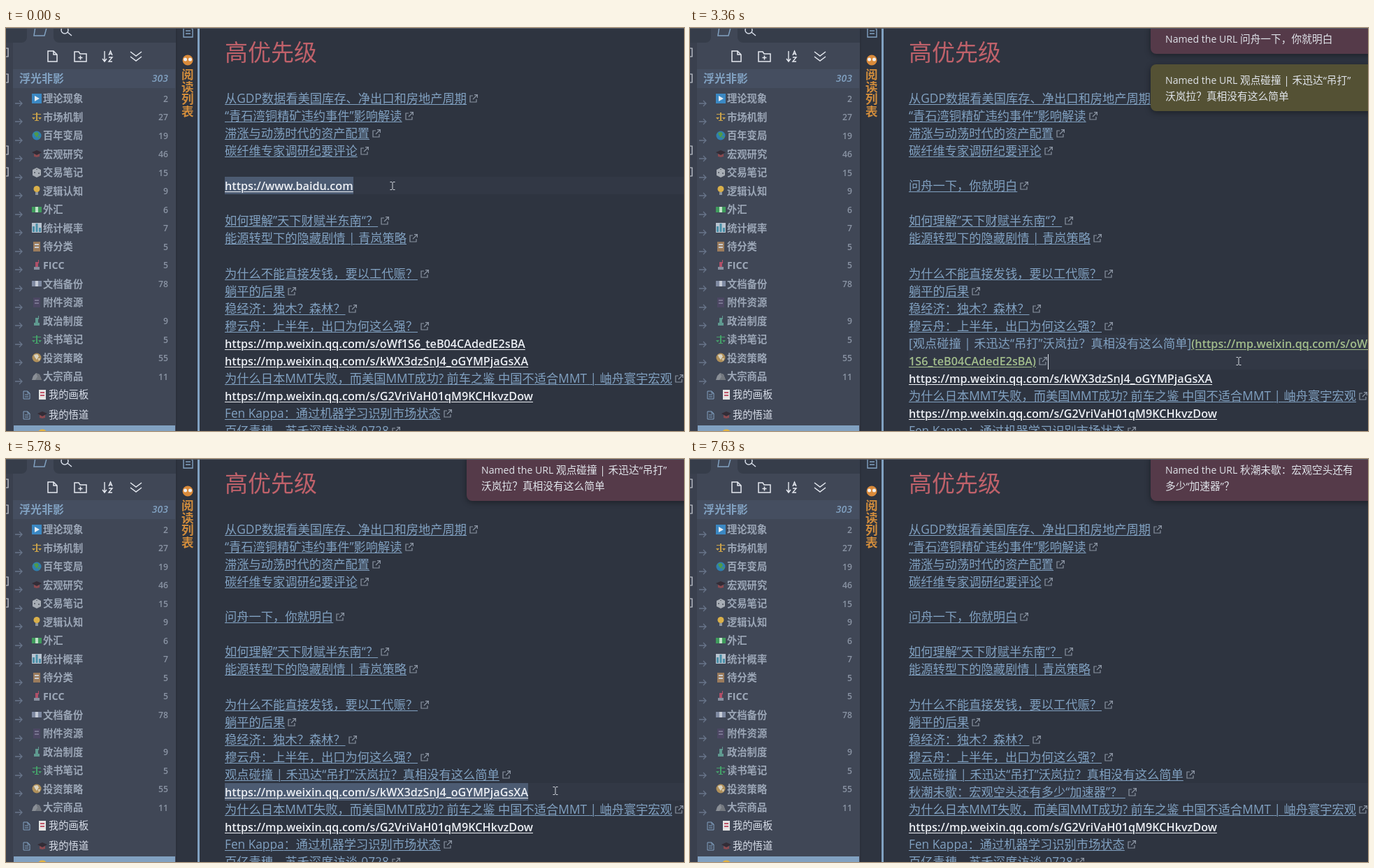
These frames come from a looping animation (970x577 px, 7650 ms). An HTML page:

```html
<!DOCTYPE html>
<html lang="zh">
<meta charset="utf-8">
<title>Link titles</title>
<style>
html,body{margin:0;width:100%;height:100%;overflow:hidden;background:#2e3440}
#stage{position:relative;width:970px;height:577px;overflow:hidden;font:17.25px/25.1px "Open Sans","Noto Sans CJK SC",sans-serif;color:#eceff4}
#stage div,#stage>svg{position:absolute;white-space:pre}
svg{overflow:visible}
.label{line-height:20px;font-size:14.3px;font-weight:700;color:#9ca7b7}
.count{width:100px;text-align:right;font-size:12.2px;font-weight:600;color:#8b95a5}
.row{left:313px;width:657px;height:25.1px}
.active{background:#323845}
.link,.url,.target{text-decoration:underline 1px;text-underline-offset:2px}
.link,.raw{color:#81a1c1;font-weight:300}
.link b,.raw b{font-weight:400}
.url,.target{font-size:16.2px;font-weight:600}
.target{color:#a3be8c}
.picked{display:inline-block;height:25.1px;background:#4c5b72}
.ext{width:12px;height:12px;margin:0 1px 0 4px;fill:none;stroke:#8a93a1;stroke-width:1.2}
.caret{display:inline-block;width:1px;height:22px;margin-right:-1px;background:#d8dee9;vertical-align:-6px}
#toasts{top:-7px;width:340px}
#toasts p{margin:0 0 15px;padding:10.5px 21px;border-radius:8px;font-size:14.72px;line-height:23px;background:#553a49;color:#e0e4ea;box-shadow:0 2px 8px #0006}
#toasts p+p{background:#545134}
#toasts small{font-size:14.1px}
</style>
<div id="stage"></div>
<script>
const stage = document.getElementById('stage');
const LOOP = 7650, FRAME = 135, BLINK = 500, PITCH = 25.1, FIRST_ROW = 87.5;

const add = html => stage.insertAdjacentHTML('beforeend', html);
const box = (x, y, w, h, color, extra = '') =>
  add(`<div style="left:${x}px;top:${y}px;width:${w}px;height:${h}px;background:${color};${extra}"></div>`);
const label = (x, y, text, css = '', type = '') =>
  add(`<div class="label ${type}" style="left:${x}px;top:${y - 10}px;${css}">${text}</div>`);
const count = (y, n, css) => label(132, y, n, css, 'count');
const line = (x, y, path, color = '#e5e9f0', width = 1.5) =>
  add(`<svg style="left:${x}px;top:${y}px" width="1" height="1"><path d="${path}" fill="none" stroke="${color}" stroke-width="${width}"/></svg>`);
const disc = (x, y, r) => `M${x - r} ${y}a${r} ${r} 0 1 0 ${2 * r} 0a${r} ${r} 0 1 0 ${-2 * r} 0z`;

// Small two-colour pictures: base shape, then accent
const shapes = {
  play: ['M0 0h14v14H0z', 'M4 3l7 4-7 4z'],
  scales: ['M6 1h2v11H6zM1 3h12v1H1zM4 12h6v1H4z', 'M0 8h5l-2.5 3zM9 8h5l-2.5 3z'],
  round: [disc(7, 7, 6.5), 'M3 3l5-1 2 3-3 5-3-4zM9 8h3l-2 4z'],
  cap: ['M0 5l7-3 7 3-7 4z', 'M3 7l4 2 4-2v4l-4 1-4-1z'],
  cube: ['M1 3l6-3 6 3v8l-6 3-6-3z', 'M3 6h2v2H3zM9 7h2v2H9zM6 2h2v1H6z'],
  bulb: [disc(7, 4.5, 4.5), 'M5 9h4v4H5z'],
  note: ['M0 3h14v8H0z', 'M5 3h4v8H5z'],
  bars: ['M0 0h14v14H0z', 'M1 5h3v8H1zM5.5 1h3v12h-3zM10 7h3v6h-3z'],
  sheet: ['M2 0h10v14H2z', 'M4 3h6v2H4zM4 7h6v2H4z'],
  figure: ['M5 3h4v7H5zM9 0h1v5H9z', 'M3 10h8v4H3z'],
  face: [disc(7, 8, 7.5), disc(3.5, 7, 2.5) + disc(10.5, 7, 2.5)],
  pile: ['M0 12l2-6 4-4 5 2 3 8z', 'M6 2l2 5-3 5h9l-3-8z'],
};
const picture = (x, y, shape, ...colors) =>
  add(`<svg style="left:${x}px;top:${y}px" width="14" height="14">` +
    shapes[shape].map((d, i) => `<path fill="${colors[i]}" d="${d}"/>`).join('') + '</svg>');

// Sidebar
const folders = [
  ['理论现象', 2, 'play', '#3b88c3', '#e4ebf2'],
  ['市场机制', 27, 'scales', '#c9a14a', '#c9a14a'],
  ['百年变局', 19, 'round', '#2f7fb0', '#4f9a4a'],
  ['宏观研究', 46, 'cap', '#332c36', '#8a4a50'],
  ['交易笔记', 15, 'cube', '#a7adb5', '#646a74'],
  ['逻辑认知', 9, 'bulb', '#d9b04a', '#8d949e'],
  ['外汇', 6, 'note', '#3f9b5c', '#bfe0c8'],
  ['统计概率', 7, 'bars', '#b9c4d0', '#4a8fa8'],
  ['待分类', 5, 'sheet', '#9a7b5c', '#c9ccd0'],
  ['FICC', 5, 'figure', '#b04f68', '#8790a0'],
  ['文档备份', 78, 'note', '#7f8aa2', '#c5cbd6'],
  ['附件资源', '', 'sheet', '#4c4763', '#77738f'],
  ['政治制度', 9, 'figure', '#5f9a90', '#5f9a90'],
  ['读书笔记', 5, 'scales', '#45a06a', '#45a06a'],
  ['投资策略', 55, 'round', '#b0905a', '#d9d4c4'],
  ['大宗商品', 11, 'pile', '#8a8f96', '#73787f'],
];

box(0, 0, 245, 577, '#3a404e');
box(10, 0, 233, 577, '#404756');
box(68, 0, 176, 21, '#363d4a', 'border-radius:0 0 0 8px');
box(0, 0, 30, 21, '#363d4a', 'border-radius:0 0 8px 0');
box(10, 59, 232, 27, '#454e60');
for (const y of [28, 65, 168, 199]) line(0, y, 'M0 1h3v12h-3', '#d0d5de', 1.2);

line(40, 0, 'M2-2L0 11h15l3-11h-6', '#81a1c1');
line(79, 0, 'M0 3a5 5 0 0 0 10 0a5 5 0 0 0-10 0M9 6l6 5', '#d8dee9');
line(59, 32, 'M1 1h8l5 5v10H1zM9 1v5h5');
line(97, 33, 'M1 1h6l2 3h9v11H1zM9.5 6.5v6M6.5 9.5h6');
line(138, 33, 'M3 0v14M0 11l3 4 3-4M9 6l2.5-6 2.5 6M10 4h3M9 9h5l-5 6h5', '#e5e9f0', 1.4);
line(178, 34, 'M0 0l8 6 8-6M0 7l8 6 8-6');

label(19, 72, '浮光非影', 'font-size:16px;color:#81a1c1');
count(72, 303, 'font-size:14px;font-style:italic;color:#81a1c1');
folders.forEach(([name, n, ...art], i) => {
  const y = 101 + i * 26.55;
  line(13, y + 6.5, 'M0 0h10M6-4l4 4-4 4', '#68758a', 1.3);
  picture(37, y - 7.5, ...art);
  label(53, y, name);
  count(y + 0.5, n);
});
[['我的画板', 'sheet', '#e4e4e4', '#c0566a'], ['我的悟道', 'cap', '#332c36', '#8a4a50']].forEach(([name, ...art], i) => {
  const y = 525 + i * 28.5;
  line(25, y - 5, 'M0 0h6l3 3v8H0zM6 0v3h3M2 5h5M2 8h5', '#81a1c1', 1);
  picture(45, y - 7, ...art);
  label(61, y, name, 'font-weight:400;color:#d8dee9');
});
box(11, 569, 231, 8, '#81a1c1');
picture(45, 574, 'face', '#e3b341', '#e3b341');

// Vertical tab
box(243, 0, 2, 577, '#2b303b');
box(274, 0, 3, 577, '#81a1c1');
line(254, 0, 'M0-2h9l4 4v11H0zM3 4h7M3 8h7', '#81a1c1', 1.4);
picture(253, 38, 'face', '#d98a3a', '#f0f0f0');
[...'阅读列表'].forEach((c, i) => label(251, 66 + i * 17.6, c, 'font-size:17.5px;color:#d08c3c'));
label(313, 35, '高优先级', 'font-size:33px;font-weight:400;color:#bf616a');

// Document
const WX = 'https://mp.weixin.qq.com/s/';
const EXT = '<svg class="ext" viewBox="0 0 12 12"><path d="M5 2H1v9h9V7M7 .6h4.4V5M11 1L5 7"/></svg>';
const span = (type, text) => `<span class="${type}">${text}</span>`;
const latin = text => text.replace(/[!-~“”]+/g, '<b>$&</b>');
const link = text => span('link', latin(text)) + EXT;
const url = text => span('url', text);

// Each address gets a title, is rendered as a link, and its notice is dismissed.
const addresses = [
  { title: '问舟一下，你就明白', head: 'https://www.baidu.com', tail: '',
    named: 270, rendered: 2170, dismissed: 4330 },
  { title: '观点碰撞 | 禾迅达“吊打”沃岚拉？真相没有这么简单', head: WX + 'oWf', tail: '1S6_teB04CAdedE2sBA', wrap: '沃',
    named: 3360, rendered: 4200, dismissed: 7200 },
  { title: '秋潮未歇：宏观空头还有多少“加速器”？ ', head: WX + 'kWX3dzSnJ4_o', tail: 'GYMPjaGsXA', wrap: '多',
    named: 6070, rendered: 7630, dismissed: LOOP },
];

function entry(t, { title, head, tail, named, rendered }) {
  if (t < named) return [url(head + tail)];
  if (t >= rendered) return [link(title)];
  const markdown = span('raw', latin(`[${title}]`)) + span('target', '(' + head);
  const end = span('target', tail + ')') + EXT;
  return tail ? [markdown, end] : [markdown + end];
}

const rowsAt = t => [
  link('从GDP数据看美国库存、净出口和房地产周期'),
  link('“青石湾铜精矿违约事件”影响解读'),
  link('滞涨与动荡时代的资产配置'),
  link('碳纤维专家调研纪要评论'),
  '',
  ...entry(t, addresses[0]),
  '',
  link('如何理解”天下财赋半东南“？'),
  link('能源转型下的隐藏剧情 | 青岚策略'),
  '',
  link('为什么不能直接发钱，要以工代赈？'),
  link('躺平的后果'),
  link('稳经济：独木？森林？'),
  link('穆云舟：上半年，出口为何这么强？'),
  ...entry(t, addresses[1]),
  ...entry(t, addresses[2]),
  link('为什么日本MMT失败，而美国MMT成功? 前车之鉴 中国不适合MMT | 岫舟寰宇宏观'),
  url(WX + 'G2VriVaH01qM9KCHkvzDow'),
  link('Fen Kappa：通过机器学习识别市场状态'),
  link('百亿青穗，苏禾深度访谈-0728'),
];

// Where the editor's focus is: from time `at`, rows `from` to `to`
const focus = [
  { at: 0, from: 5, to: 5, picked: true, idle: true },
  { at: 270, from: 5, to: 5 },
  { at: 2170, from: 14, to: 14, picked: true },
  { at: 3360, from: 14, to: 15 },
  { at: 4050, from: 16, to: 16 },
  { at: 4200, from: 16, to: 16, picked: true },
  { at: 5260, from: 15, to: 15, picked: true },
  { at: 6070, from: 15, to: 16 },
  { at: 7630, from: 15, to: 15, idle: true },
];

// Pointer strokes: start, end, x, y
const home = [553, 226];
const strokes = [
  [410, 940, 567, 335], [940, 1220, 557, 422], [1220, 1800, 787, 457], [2950, 3220, 785, 477],
  [3370, 3900, 779, 500], [4440, 4700, 786, 475], [6210, 6610, 860, 610],
];
function pointerAt(t) {
  const now = Math.floor(t / FRAME) * FRAME;
  return strokes.reduce(([x, y], [start, end, toX, toY]) => {
    const p = Math.min(1, Math.max(0, (now - start) / (end - start)));
    const eased = p * p * (3 - 2 * p);
    return [x + (toX - x) * eased, y + (toY - y) * eased];
  }, home);
}

add('<div id="doc"></div><div id="toasts"></div>');
box(0, 0, 970, 1, '#565b65');
add('<svg id="mouse" width="1" height="1"><path d="M-3.5-5.5h2.5l1 1 1-1h2.5M0-4.5v9M-3.5 5.5h2.5l1-1 1 1h2.5" fill="none" stroke="#d4d8df"/></svg>');
const [doc, toasts, mouse] = ['doc', 'toasts', 'mouse'].map(id => document.getElementById(id));

const shown = new Map();
function update(element, html) {
  if (shown.get(element) === html) return;
  shown.set(element, html);
  element.innerHTML = html;
}

function draw(t) {
  const { at, from, to, picked, idle } = focus.findLast(f => f.at <= t);
  const caret = !idle && (t - at) % (2 * BLINK) < BLINK ? '<i class="caret"></i>' : '';
  update(doc, rowsAt(t).map((html, i) => {
    const active = i >= from && i <= to;
    if (active && picked) html = span('picked', html);
    if (i === to) html += caret;
    return `<div class="row${active ? ' active' : ''}" style="top:${FIRST_ROW + i * PITCH}px">${html}</div>`;
  }).join(''));

  const live = addresses.filter(a => t >= a.named && t < a.dismissed);
  toasts.style.left = (live.some(a => a.wrap) ? 659 : 694) + 'px';
  update(toasts, live.map(({ title, wrap }) =>
    `<p><small>Named the URL </small>${wrap ? title.replace(wrap, '<br>' + wrap) : title}</p>`).join(''));

  const [x, y] = pointerAt(t);
  mouse.style.left = x + 'px';
  mouse.style.top = y + 'px';
}

const start = performance.now();
function tick() {
  draw((performance.now() - start) % LOOP);
  requestAnimationFrame(tick);
}
tick();
</script>
</html>
```
